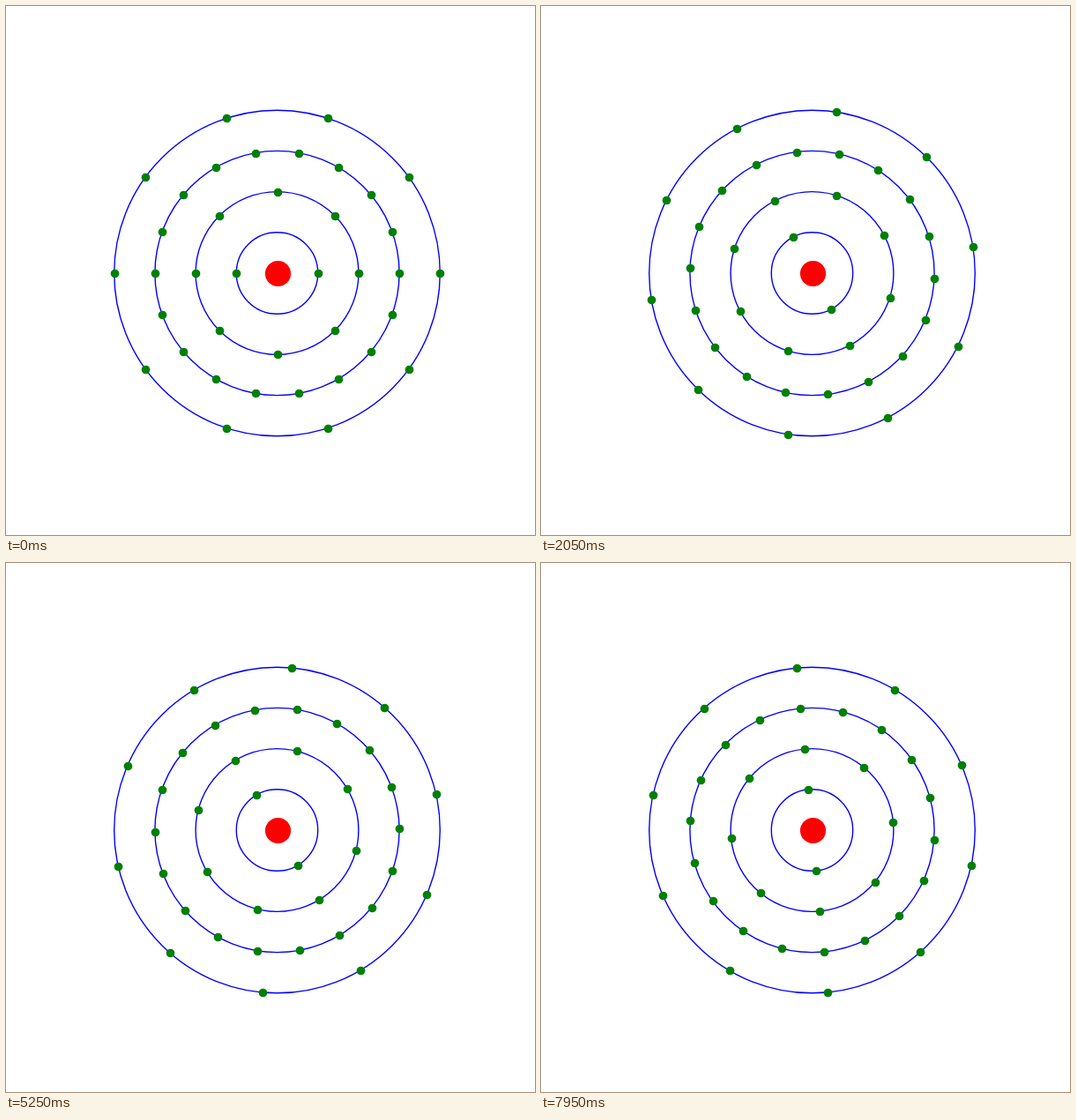
These frames come from a looping animation (600 px wide and 600 px high, 8 s). An HTML page with a canvas:

```html
<!DOCTYPE html>
<html lang="en">
<head>
<meta charset="utf-8">
<title>Electron shells</title>
<style>
  html, body { margin: 0; height: 100%; overflow: hidden; background: #fff; }
  canvas { display: block; }
</style>
</head>
<body>
<canvas id="stage" width="600" height="600"></canvas>
<script>
const ctx = document.getElementById("stage").getContext("2d");
const CENTER_X = 307.5, CENTER_Y = 303;
const SHELL_GAP = 46.2;
const SHELLS = [2, 8, 18, 10]; // electrons per shell, innermost first
const STEP_MS = 50, STEP_COUNT = 160, STEP_ANGLE = 0.05;

function circlePath(x, y, radius) {
  ctx.beginPath();
  ctx.arc(x, y, radius, 0, 2 * Math.PI);
}

// Discs sit on whole pixels.
function disc(x, y, radius, color) {
  circlePath(Math.floor(x + 0.5) + 0.5, Math.floor(y + 0.5) + 0.5, radius);
  ctx.fillStyle = color;
  ctx.fill();
}

function draw(step) {
  ctx.fillStyle = "#fff";
  ctx.fillRect(0, 0, 600, 600);
  ctx.strokeStyle = "#00f";
  ctx.lineWidth = 1.39;
  disc(CENTER_X, CENTER_Y, 14.58, "#f00");

  SHELLS.forEach((electrons, shell) => {
    const radius = SHELL_GAP * (shell + 1);
    circlePath(CENTER_X, CENTER_Y, radius);
    ctx.stroke();
    for (let i = 0; i < electrons; i++) {
      const angle = step * STEP_ANGLE + (2 * Math.PI * i) / electrons;
      disc(CENTER_X + radius * Math.cos(angle),
           CENTER_Y - radius * Math.sin(angle), 4.86, "#008000");
    }
  });
}

function tick() {
  draw(Math.floor(performance.now() / STEP_MS) % STEP_COUNT);
  requestAnimationFrame(tick);
}
tick();
</script>
</body>
</html>
```
